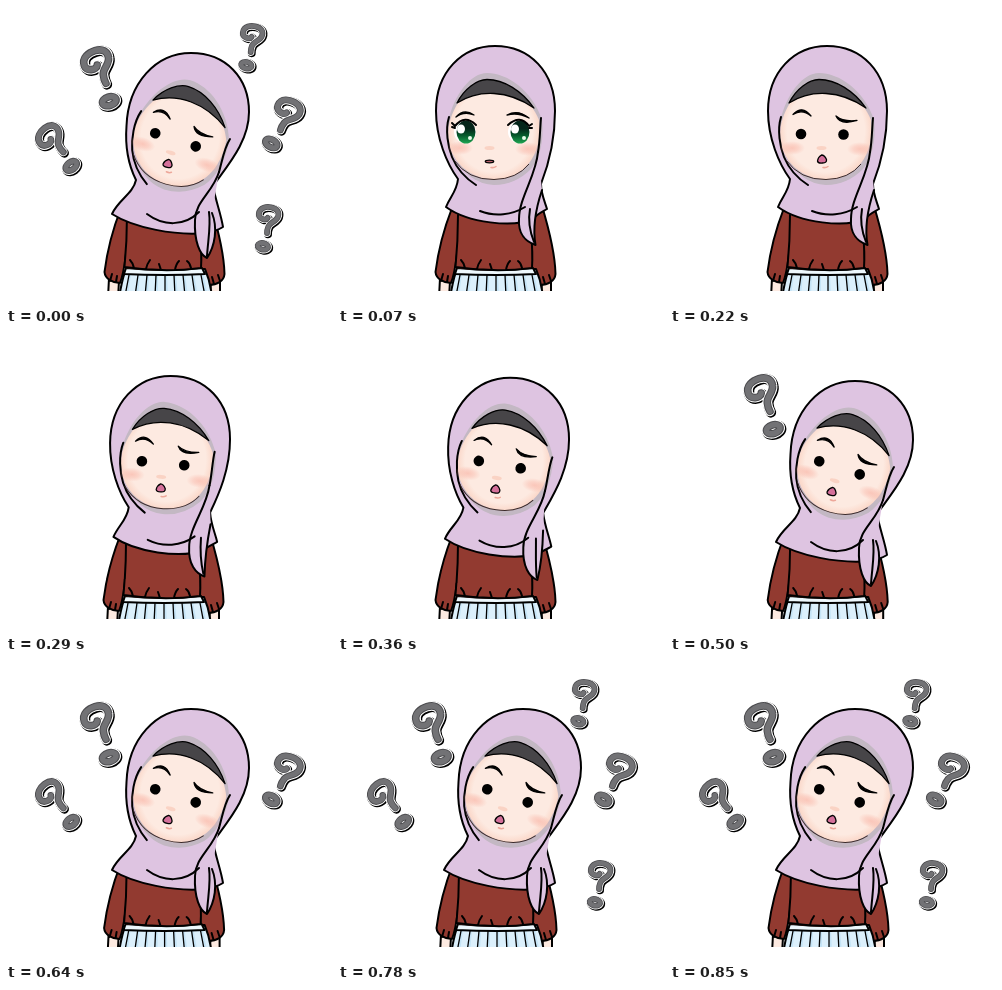
Write an HTML page that moves like this. It is 326 px wide and 300 px high and loops after 920 ms.

```html
<!DOCTYPE html>
<html lang="en">
<head>
<meta charset="utf-8">
<title>Puzzled girl</title>
<style>
  html, body { margin: 0; width: 100%; height: 100%; overflow: hidden; background: #fff; }
  svg { display: block; width: 326px; height: 300px; }
  .ink { stroke: #000; stroke-width: 2; stroke-linecap: round; stroke-linejoin: round; }
  .fine { stroke-width: 1.3; }
  .line { fill: none; }
  .red { fill: #923a30; }
  .scarf { fill: #dec4e1; }
  .mark { fill: none; stroke-linecap: round; stroke-linejoin: round; }
</style>
</head>
<body>
<svg viewBox="0 0 326 300">
  <defs>
    <clipPath id="floor"><rect width="326" height="285"/></clipPath>
    <radialGradient id="blush">
      <stop offset="0" stop-color="#f9b3a4" stop-opacity=".65"/>
      <stop offset=".5" stop-color="#f9b3a4" stop-opacity=".4"/>
      <stop offset="1" stop-color="#f9b3a4" stop-opacity="0"/>
    </radialGradient>
    <radialGradient id="skin">
      <stop offset=".85" stop-color="#fdeae1"/>
      <stop offset="1" stop-color="#fbd9cb"/>
    </radialGradient>
    <linearGradient id="iris" x2="0" y2="1">
      <stop offset=".35" stop-color="#04251a"/>
      <stop offset=".65" stop-color="#055a2c"/>
      <stop offset="1" stop-color="#1fa552"/>
    </linearGradient>
    <g id="eye">
      <ellipse cy="1" rx="11" ry="11" fill="#fff"/>
      <ellipse cx="1" cy="1" rx="9.5" ry="11.5" fill="url(#iris)"/>
      <ellipse cx="-4" cy="-2" rx="4" ry="4.5" fill="#fff"/>
      <circle cx="5" cy="7" r="2" fill="#e6fbe9"/>
    </g>
    <g id="question">
      <path d="M-1 4C-3 9-13 7-13.500 1C-14-8-5-10.500 1-10.500C9-10.500 13-6 12 0C11 7 3 9 2 15Q1 20 2 24"/>
      <ellipse cy="42" rx="7" ry="4.300"/>
    </g>
  </defs>
  <g clip-path="url(#floor)">
    <g id="body">
      <path class="ink" fill="#fdeae1" d="M102 272L101 292H111L112 275ZM204 276L203 292H213L213 275Z"/>
      <path class="ink red" d="M114 202C107 220 100 246 97.500 266C98 273 106 277 113 277C119 262 121 230 122 206Z"/>
      <path class="ink red" d="M190 203L194 262Q199 272 202 279C210 279 217 275 217.500 268C217 245 210 220 204 200Z"/>
      <path class="ink" fill="#dcf0fc" d="M119 263C116 270 114 280 112 292H205C204 280 201 270 198 263Z"/>
      <g id="pleats"></g>
      <path class="ink" fill="#eef8fd" d="M119 262Q158 266 195 262L198 268Q158 270 117 268Z"/>
      <path class="red" d="M120 200L118 262Q157 267 194 262L193 200Z"/>
      <path class="ink line" d="M120 209Q120 235 117.500 261Q157 267 194 262Q195 246 193 228M127 262Q126 257 123 254M139 263Q140 258 143 254M154 264L152 258M168 264Q169 258 172 255M184 262Q183 257 180 255M103 275L105 268M109 276L110 270M207 278L205 271M213 275L211 269"/>
    </g>
    <path id="hood" class="ink scarf"/>
    <g id="head">
      <path fill="#c3b8c3" d="M110 116C116 88 133 67 149 67C169 67 194 84 204 114Q207 145 193 163Q177 179 156 179Q131 178 115 150Z"/>
      <path fill="url(#skin)" d="M110.500 122C114 98 133 76 149 75C170 76 192 92 201 114C205 150 185 173.500 156 173.500C128 173 107 150 110.500 122Z"/>
      <path class="ink fine" fill="#474548" d="M119 97C126 83 139 73.500 149 73.500C166 73.500 184 85 196 102C170 84 141 83 119 97Z"/>
      <path class="ink line" d="M111 111C107 124 110 141 114 151Q121 168 138 179"/>
      <path class="line" stroke="#3b2a2a" d="M116 154Q130 174 156 173.500Q179 173 191 158"/>
      <ellipse cx="122" cy="142" rx="13" ry="7" fill="url(#blush)"/>
      <ellipse cx="190" cy="143" rx="13" ry="7" fill="url(#blush)"/>
      <ellipse cx="151.500" cy="142" rx="5" ry="2" fill="#fad3c4"/>
      <path class="line" stroke="#eda79a" stroke-width="1.500" stroke-linecap="round" d="M153 161.500Q156 162 158 160.500"/>
      <g id="calm">
        <use href="#eye" x="127" y="125"/>
        <use href="#eye" x="181" y="125"/>
        <path class="ink line" d="M114 117L117 120Q127 108 138 119M194 118L191 120Q182 108 170 119M114 121L117 122M194 122L191 122"/>
        <path class="ink fine" d="M118 111Q126 102 136 109Q126 105 118 111ZM169 109Q180 103 191 112Q180 106 169 109Z"/>
        <ellipse class="ink fine" cx="151.500" cy="155.500" rx="4.200" ry="1.300" fill="#b9616c"/>
      </g>
      <g id="puzzled">
        <circle cx="131" cy="128" r="5.300"/>
        <circle cx="173.500" cy="128.500" r="5.300"/>
        <path class="ink fine" d="M123 108.500Q132 98.500 141 110Q132 102.500 123 108.500ZM166 110Q170 119.500 187 114.500Q173 116 166 110Z"/>
        <path class="ink fine" fill="#d4709a" d="M151.500 149Q148 151 147.500 155Q148 157.500 152.500 157Q157 157 156.500 153.500Q154.500 149 151.500 149Z"/>
      </g>
    </g>
    <path id="tail" class="ink scarf"/>
    <path id="folds" class="ink line"/>
  </g>
  <g id="marks"></g>
</svg>
<script>
const LOOP = 920;
const TILT = 17.2;
const PIVOT = '142.5 188';

// start time, tilt amount, sideways lean, visible question marks, calm face
const STEPS = [
  [0, 1, 1, 5], [70, 0, 0, 0, true], [220, 0, 0, 0], [290, .27, 0, 0],
  [360, .54, 0, 0], [430, .8, 0, 0], [500, 1, .2, 1], [570, 1, .4, 2],
  [640, 1, .6, 3], [710, 1, .8, 4], [780, 1, 1, 5], [850, 1, 1, 5]
];

// each part: upright outline, tilted outline
const SHAPES = {
  hood: [
    'M108 201 C112 191 119 185 120 173 C109 158 98 132 98 105 C98 66 124 40 157 40 C192 40 217 66 217 105 C217 135 210 160 203 178 C203 188 207 196 209 203 C204 206 199 208 195 213 C175 222 130 217 108 201 Z',
    'M106 208 C112 194 127 188 130 174 C123 160 119 140 120.5 120 C122 77 150 47 185 47 C220 47 243 72 243 106 C243 136 221 160 207 180 C210 196 215 208 217 221 C212 224 206 226 200 227 C170 230 128 222 106 208 Z'
  ],
  tail: [
    'M200 146 C198 170 181 192 181 213 C180 228 188 236 197.5 239 C195 225 196 208 204 184',
    'M213 166 C207 186 189 196 189 214 C188 236 194 249 201 252 C209 240 212 222 206 207 C203 198 207 190 207 181'
  ],
  folds: [
    'M203 112 C202 122 202 136 200 146 M142 205 C157 211 174 209 187 201 M192 203 C190 214 192 226 196 236',
    'M224 133 C218 142 216 156 213 166 M141 208 C157 220 178 221 193 206 M203 206 C205 220 202 234 201 250'
  ]
};

// x, y, angle, scale in order of appearance
const MARKS = [
  [91, 55, -17, 1], [43.5, 130, -36, .88], [283, 104, 28, .9],
  [263, 209, 11, .76], [247, 28, 12, .76]
];

const byId = id => document.getElementById(id);
const show = (node, on) => node.setAttribute('visibility', on ? 'visible' : 'hidden');

function morph([from, to], t) {
  const goal = to.match(/[\d.]+/g);
  let i = 0;
  return from.replace(/[\d.]+/g, n => (+n + (goal[i++] - n) * t).toFixed(2));
}

byId('pleats').innerHTML = Array.from({ length: 9 }, (_, i) => {
  const top = 122 + i * 9, foot = 118 + i * 10;
  return `<path fill="#c6e4f6" d="M${top} 268L${foot} 290h3L${top + 2} 268Z"/>` +
    `<path class="ink line fine" d="M${top} 269L${foot} 290"/>`;
}).join('');

byId('marks').innerHTML = MARKS.map(([x, y, angle, scale]) => {
  const layer = (color, width, shift = 0) =>
    `<g transform="translate(${x + shift} ${y + shift}) rotate(${angle}) scale(${scale})" ` +
    `stroke="${color}" stroke-width="${width}"><use href="#question"/></g>`;
  return '<g class="mark">' + layer('#000', 10.5, 1) + layer('#fff', 9.8) +
    layer('#4c4c4f', 7.6) + layer('#727275', 5.6) + '</g>';
}).join('');
const marks = [...byId('marks').children];

function draw(time) {
  const [, tilt, lean, count, calm = false] = STEPS.findLast(step => step[0] <= time);
  for (const id in SHAPES) byId(id).setAttribute('d', morph(SHAPES[id], tilt));
  byId('head').setAttribute('transform', `rotate(${TILT * tilt} ${PIVOT})`);
  byId('body').setAttribute('transform', `translate(${lean} 0)`);
  show(byId('calm'), calm);
  show(byId('puzzled'), !calm);
  marks.forEach((mark, i) => show(mark, i < count));
}

const start = performance.now();
function tick() {
  draw((performance.now() - start) % LOOP);
  requestAnimationFrame(tick);
}
tick();
</script>
</body>
</html>
```
